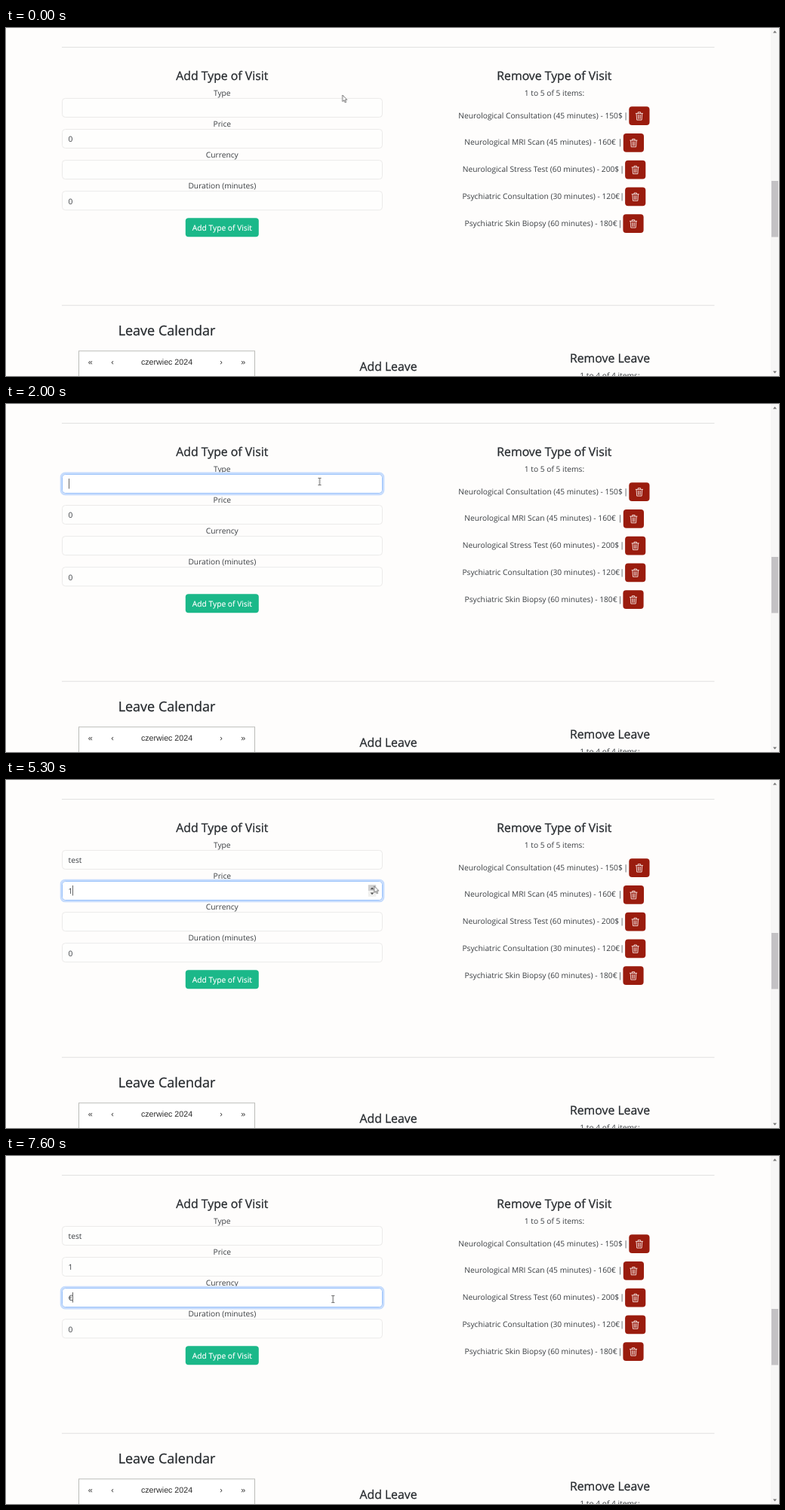
An HTML page for the animation above (8 s loop, 1024x462 px).

```html
<!DOCTYPE html>
<html lang="en">
<head>
<meta charset="utf-8">
<title>Visit types</title>
<style>
  html, body { margin: 0; width: 100%; height: 100%; overflow: hidden; background: #fefdfc; }
  svg { display: block; width: 100%; height: 100%; }
  text {
    font: 10.25px "Open Sans", "Noto Sans", sans-serif;
    fill: #3a3e42;
    text-rendering: geometricPrecision;
  }
  .mid { text-anchor: middle; }
  .head { font-size: 15.8px; fill: #262a2e; stroke: #262a2e; stroke-width: .3px; }
  .big { font-size: 18px; }
  .cal text { font: 10.67px "Liberation Sans", Arial, sans-serif; fill: #2a2a2a; text-anchor: middle; }
  .rule { stroke: #e1e0df; }
  .box { fill: #fefefd; stroke: #ebeae9; }
  .ring .glow { fill: none; stroke: #c6dcfd; stroke-width: 2.4; }
  .ring .edge { fill: #fff; stroke: #98c1fb; }

  /* One shared 8 s timeline: 1% = 80 ms */
  .ring, .pointer, .step { animation: 8s linear infinite; }
  .step { animation-timing-function: step-end; }
  .ring { opacity: 0; }
  .ring.type { animation-name: focus-type; }
  .ring.price { animation-name: focus-price; }
  .ring.currency { animation-name: focus-currency; }
  .pointer { animation-name: move; }
  .arrow { animation-name: arrow; }
  .beam { animation-name: beam; }
  .spinner { animation-name: spinner; }
  .upper { animation-name: upper; }
  .lower { animation-name: lower; }
  .caret { animation-name: caret; }
  .typed { animation-name: typed; }
  .before { animation-name: before; }
  .after { animation-name: after; }
  .euro { animation-name: euro; }

  @keyframes focus-type {
    0%, 14% { opacity: 0; } 16%, 60% { opacity: 1; } 61.9%, 100% { opacity: 0; }
  }
  @keyframes focus-price {
    0%, 60% { opacity: 0; } 61.9%, 75% { opacity: 1; } 76.9%, 100% { opacity: 0; }
  }
  @keyframes focus-currency {
    0%, 75% { opacity: 0; } 76.9%, 100% { opacity: 1; }
  }
  @keyframes move {
    0%, 12.5% { transform: translate(445.7px, 89px); animation-timing-function: ease-out; }
    15%, 48.75% { transform: translate(415.5px, 103px); animation-timing-function: ease-in-out; }
    55%, 57.5% { transform: translate(488.7px, 152px); }
    58.75%, 70% { transform: translate(487.7px, 140.7px); animation-timing-function: ease-in-out; }
    75%, 78.75% { transform: translate(434.7px, 188.5px); }
    80%, 100% { transform: translate(433.2px, 190px); }
  }
  @keyframes arrow {
    0% { opacity: 1; } 13.2% { opacity: 0; } 51.25% { opacity: 1; } 71.9%, 100% { opacity: 0; }
  }
  @keyframes beam {
    0% { opacity: 0; } 13.2% { opacity: 1; } 51.25% { opacity: 0; } 71.9%, 100% { opacity: 1; }
  }
  @keyframes spinner {
    0% { opacity: 0; } 52.5% { opacity: 1; } 73.1%, 100% { opacity: 0; }
  }
  @keyframes upper {
    0% { fill: #f0f0ef; } 58.75% { fill: #d0d0d0; } 71.9%, 100% { fill: #f0f0ef; }
  }
  @keyframes lower {
    0% { fill: #d0d0d0; } 58.75%, 100% { fill: #f0f0ef; }
  }
  @keyframes caret {
    0% { opacity: 0; transform: translate(83px, 99px); }
    14% { opacity: 1; transform: translate(83px, 99px); }
    18.75% { opacity: 0; transform: translate(83px, 99px); }
    25% { opacity: 1; transform: translate(83px, 99px); }
    35% { opacity: 1; transform: translate(100px, 99px); }
    60% { opacity: 1; transform: translate(88px, 140px); }
    75% { opacity: 1; transform: translate(83px, 181px); }
    95%, 100% { opacity: 1; transform: translate(88px, 181px); }
  }
  @keyframes typed { 0% { opacity: 0; } 35%, 100% { opacity: 1; } }
  @keyframes before { 0% { opacity: 1; } 60%, 100% { opacity: 0; } }
  @keyframes after { 0% { opacity: 0; } 60%, 100% { opacity: 1; } }
  @keyframes euro { 0% { opacity: 0; } 95%, 100% { opacity: 1; } }
</style>
</head>
<body>
<svg viewBox="0 0 1024 462" preserveAspectRatio="none">
  <defs>
    <g id="trash" fill="none" stroke="#f6e6e4" stroke-width=".9" stroke-linecap="round" stroke-linejoin="round">
      <path d="M-4.6-3.5H4.6M-1.7-3.7V-5.2H1.7V-3.7M-3.8-3.3-3.2 5.2H3.2L3.8-3.3"/>
      <path d="M-1.6-1.6-1.4 3.4M0-1.6V3.4M1.6-1.6 1.4 3.4" stroke-width=".75"/>
    </g>
  </defs>

  <path class="rule" d="M74 25.6H938.5M74 368.2H938.5"/>

  <text class="mid head" x="286.3" y="68.7">Add Type of Visit</text>
  <g id="fields"></g>
  <text x="82.6" y="110.3" class="step typed">test</text>
  <text x="82.6" y="151.3" class="step before">0</text>
  <text x="82.6" y="151.3" class="step after">1</text>
  <text x="82.6" y="192.3" class="step euro">€</text>
  <text x="82.6" y="233.5">0</text>
  <rect class="step caret" width="1" height="13.5" fill="#666"/>
  <g class="step spinner">
    <rect class="step upper" x="479.8" y="139.2" width="10.4" height="7.8"/>
    <rect class="step lower" x="479.8" y="147" width="10.4" height="7.8"/>
    <path d="M482.6 145.2 485 142.4 487.4 145.2ZM482.6 149.4 485 152.2 487.4 149.4Z" fill="#505050"/>
  </g>
  <rect x="237.8" y="252.3" width="97" height="25" rx="4" fill="#1bb889"/>
  <text class="mid" x="286.4" y="269.4" style="fill:#fff;stroke:#fff;stroke-width:.15px">Add Type of Visit</text>

  <text class="mid head" x="726.3" y="68.7">Remove Type of Visit</text>
  <text class="mid" x="726.5" y="89.7">1 to 5 of 5 items:</text>
  <g id="visits"></g>

  <text class="mid head big" x="213" y="408.3">Leave Calendar</text>
  <g class="cal">
    <rect x="96.5" y="428.8" width="233" height="60" fill="#fff" stroke="#bbbcb8"/>
    <text x="111.7" y="447.3">«</text>
    <text x="141" y="447.3">‹</text>
    <text x="213" y="447.3">czerwiec 2024</text>
    <text x="285" y="447.3">›</text>
    <text x="314.3" y="447.3">»</text>
  </g>
  <text class="mid head" x="506.5" y="455">Add Leave</text>
  <text class="mid head" x="800" y="444.4">Remove Leave</text>
  <text class="mid" x="800" y="465">1 to 4 of 4 items:</text>

  <rect x="1013" width="11" height="462" fill="#f7f6f6"/>
  <rect x="1014" y="203" width="9" height="74.5" fill="#c3c1c4"/>
  <path d="M1016 6.5 1018.5 3.5 1021 6.5ZM1016 455.5 1018.5 458.5 1021 455.5Z" fill="#777"/>

  <g class="pointer">
    <path class="step arrow" d="M0 0V8.6L2 6.9 3.4 10 4.8 9.4 3.4 6.3H6Z" fill="#fff" stroke="#555" stroke-width=".8" stroke-linejoin="round"/>
    <path class="step beam" d="M-2-4.6H-.6L0-4.2.6-4.6H2M0-4.2V4.2M-2 4.6H-.6L0 4.2.6 4.6H2" fill="none" stroke="#444" stroke-width=".9"/>
  </g>
</svg>
<script>
  const labels = ["Type", "Price", "Currency", "Duration (minutes)"];
  const rect = (cls, x, y, w, h, r) =>
    `<rect class="${cls}" x="${x}" y="${y}" width="${w}" height="${h}" rx="${r}"/>`;

  const field = (label, i) => {
    const y = 93.4 + i * 41.1;
    const ring = i < 3
      ? `<g class="ring ${label.toLowerCase()}">
          ${rect("glow", 72.9, y - 1.6, 427.2, 28.2, 5.2)}
          ${rect("edge", 74.5, y, 424, 25, 4)}</g>`
      : "";
    return `<text class="mid" x="286.3" y="${y - 3.7}">${label}</text>
      ${rect("box", 74.5, y, 424, 25, 4)}${ring}`;
  };

  // Name, left edge of the text, left edge of the button
  const visits = [
    ["Neurological Consultation (45 minutes) - 150$", 599.2, 825.3],
    ["Neurological MRI Scan (45 minutes) - 160€", 607.2, 817.8],
    ["Neurological Stress Test (60 minutes) - 200$", 604.7, 820.1],
    ["Psychiatric Consultation (30 minutes) - 120€", 604.4, 820.1],
    ["Psychiatric Skin Biopsy (60 minutes) - 180€", 607.5, 817.4],
  ];
  const visit = ([name, left, button], i) => {
    const y = 116.6 + i * 35.75;
    return `<text x="${left}" y="${y + 3.1}">${name}</text>
      <text class="mid" x="${button - 4.1}" y="${y + 3.1}">|</text>
      <rect x="${button}" y="${y - 12.4}" width="27.2" height="24.8" rx="4" fill="#9a1c0e"/>
      <use href="#trash" x="${button + 13.6}" y="${y + .3}"/>`;
  };

  document.getElementById("fields").innerHTML = labels.map(field).join("");
  document.getElementById("visits").innerHTML = visits.map(visit).join("");
</script>
</body>
</html>
```
